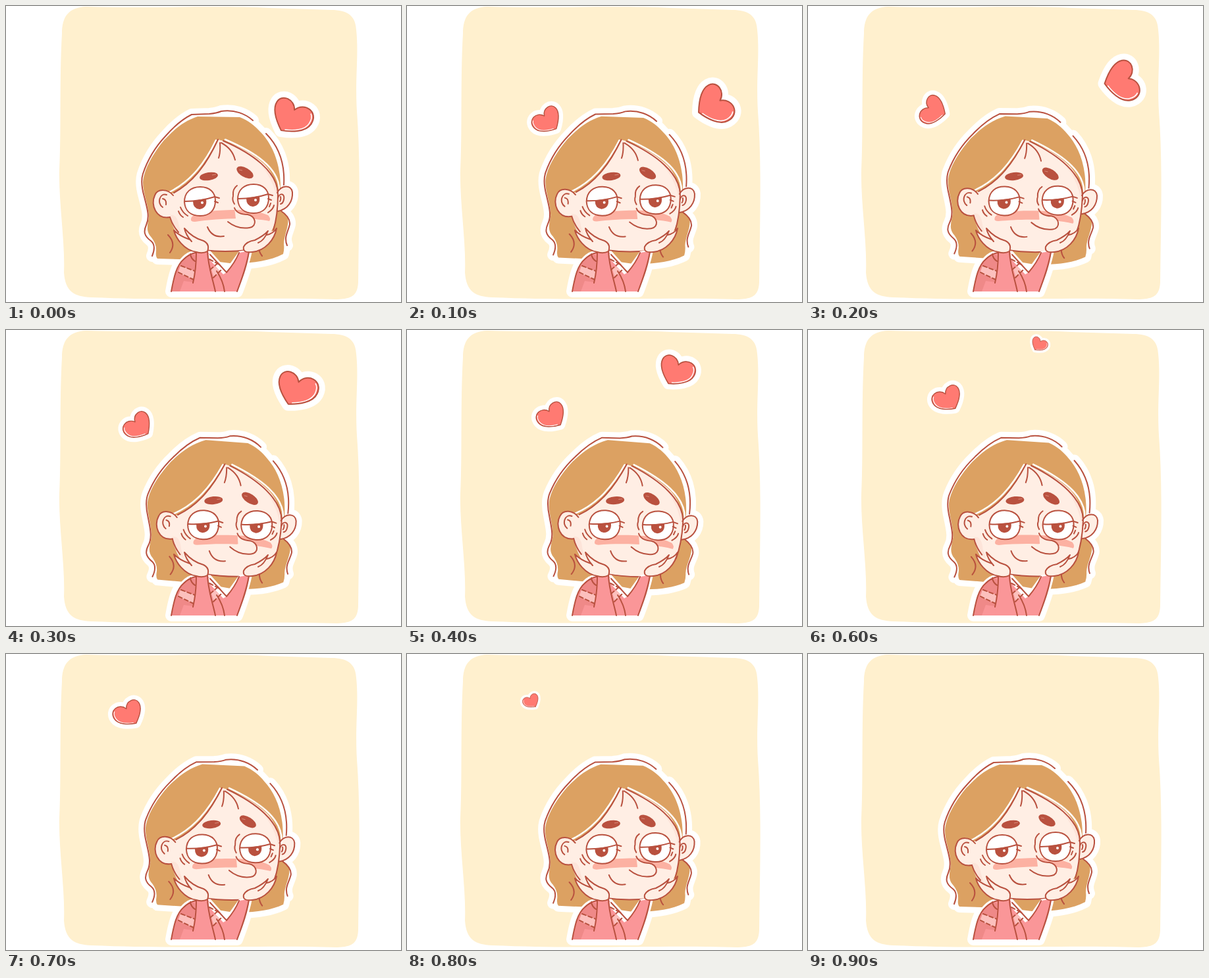
An HTML page for the animation above (1 s loop, 600x450 px).

```html
<!DOCTYPE html>
<html lang="en">
<head>
<meta charset="utf-8">
<title>Daydream</title>
<style>
html, body { margin: 0; width: 100%; height: 100%; overflow: hidden; background: #fff }
svg { display: block; width: 100vw; height: 100vh }
.line { fill: none; stroke: #b9513f; stroke-width: 2; stroke-linecap: round; stroke-linejoin: round }
.edge { fill: #fff; stroke: #fff; stroke-width: 18; stroke-linejoin: round; stroke-linecap: round }
.skin { fill: #ffeee4 }
.dark { fill: #b9513f }
.gap { fill: none; stroke: #fff; stroke-width: 2.5; stroke-linecap: round }
</style>
</head>
<body>
<svg viewBox="0 0 600 450">
  <defs>
    <path id="hair" d="M208 268C209 250 222 226 240 204C256 187 270 175 291 168L355 169C368 174 378 182 386 191C402 207 417 235 417 276L415 308L428 321C431 333 422 349 422 362Q423 370 421 377C400 388 370 392 340 391L300 386L230 384Q227 381 228 373Q229 362 221 352C211 342 216 331 217 320C216 300 208 285 208 268Z"/>
    <path id="locks" d="M222 380C227 368 225 361 220 357C209 349 209 342 213 333C219 320 214 306 210 290C206 276 205 264 208 255C214 237 226 215 243 197C257 181 270 171 282 165L309 164Q320 163 327 160C347 157 364 164 375 174M395 194C412 211 424 237 422 272M417 311Q432 321 431 332C429 341 425 347 425 354Q425 360 427 364"/>
    <path id="earL" d="M254 288C246 278 230 277 226 288C219 302 228 325 249 321"/>
    <path id="earR" d="M412 284C418 272 433 271 435 283C436 297 428 309 413 312"/>
    <path id="body" d="M251 434C255 412 259 394 270 384Q278 376 288 375L309 376L335 405L356 376L370 374C366 395 358 415 351 434Z"/>
    <path id="shape" d="M0 24C-12 17-29 5-29-9C-29-24-8-27 0-13C6-32 33-31 33-9C33 6 14 18 0 24Z"/>
    <g id="heart">
      <use href="#shape" fill="#fff" stroke="#fff" stroke-width="20" stroke-linejoin="round"/>
      <use href="#shape" fill="#ff7a72"/>
      <path d="M4 20C17 14 30 4 30-8Q30-18 24-22" fill="none" stroke="#fff" stroke-width="1.6"/>
      <use href="#shape" class="line"/>
    </g>
  </defs>

  <path fill="#fff0ce" d="M122 1C215 4 320-1 400 3L494 6C521 6 531 17 532 36C536 75 530 108 533 160C539 240 536 330 535 420C534 440 526 445 503 446C390 442 280 449 130 443C103 442 90 434 88 405C90 360 80 300 81 250C84 190 81 110 85 42C85 16 95 2 122 1Z"/>

  <use href="#body" class="edge"/>
  <g class="head">
    <g class="edge">
      <use href="#hair"/><use href="#earL"/><use href="#earR"/>
      <use href="#locks" fill="none"/>
    </g>
    <use href="#hair" fill="#dca162"/>
    <use href="#locks" class="line"/>
    <path class="line" d="M246 348Q259 361 249 375M384 366Q384 374 389 380"/>
    <use href="#earR" class="skin"/>
    <path class="skin" d="M322 203C305 240 285 270 250 286L249 320C254 340 262 352 272 362C290 374 340 374 368 371C395 362 410 340 412 310C416 282 409 257 392 240C372 222 350 212 330 205Z"/>
    <path fill="#fde0d4" opacity=".7" d="M249 318Q260 315 263 335L268 350Q255 339 249 318ZM374 228Q413 250 411 290Q402 252 374 228Z"/>
    <use href="#earL" class="skin"/>
    <path class="gap" d="M319 204C303 237 282 266 248 283M333 203C373 220 418 245 415 284"/>
    <g class="line">
      <use href="#earL"/><use href="#earR"/>
      <path d="M322 203C306 238 286 267 255 284M330 205C374 224 413 252 413 286C413 304 412 322 406 341M249 321Q253 334 262 344M300 371Q332 375 368 371M325 208Q326 222 323 231M327 208Q344 217 348 234"/>
      <path d="M244 287C233 284 229 300 238 306M238 293Q244 294 243 302M413 292C415 284 424 284 422 294Q421 300 417 301M417 290Q418 294 416 297"/>
    </g>
    <path fill="#fcb1a2" d="M281 324C282 313 312 311 342 310Q378 309 398 318Q403 323 400 327C372 321 320 323 287 328Q280 328 281 324Z"/>
    <path class="skin" d="M347 307Q351 317 367 317C380 319 382 335 370 337Q352 340 337 328L349 323Z"/>
    <g class="line">
      <path d="M347 307Q351 317 367 317C380 319 382 335 370 337Q352 340 337 328M306 336Q313 353 331 350"/>
      <path d="M262 312Q264 318 269 321M265 306Q268 314 276 319M398 314Q406 309 407 303M400 305L402 300M345 288Q344 278 351 273M347 301Q343 295 345 289"/>
      <g id="eye">
        <path fill="#fff" d="M271 298C271 283 281 275 295 275C310 275 318 284 318 296C318 311 309 319 295 319C280 319 272 311 271 298Z"/>
        <path class="dark" d="M285 297L303 294Q305 306 294 308Q285 307 285 297Z"/>
        <path d="M272 297Q295 297 317 290L324 292M317 297L322 299"/>
        <circle cx="298" cy="299" r="2" fill="#fff" stroke="none"/>
      </g>
      <use href="#eye" x="81" y="-4"/>
      <ellipse class="dark" cx="308" cy="259" rx="13" ry="5" transform="rotate(-9 308 259)"/>
      <ellipse class="dark" cx="363" cy="253" rx="13" ry="6" transform="rotate(30 363 253)"/>
    </g>
    <path d="M313 257L319 256M354 249L359 250" stroke="#d98a78"/>
  </g>

  <use href="#body" fill="#fff" stroke="#fff" stroke-width="7"/>
  <use href="#body" fill="#fa9698"/>
  <path fill="#ef8988" d="M251 434C255 412 259 394 270 384L283 377L288 380L285 420L270 418L264 434Z"/>
  <path fill="#fcc0bd" d="M265 395L288 403L286 416L261 406ZM312 400L325 391L329 401L316 413Z"/>
  <path fill="#fff" d="M309 376L335 405L330 408L304 380Z"/>
  <path fill="#fa9698" d="M288 372L307 372C309 395 315 415 318 434L284 434ZM368 373C365 395 358 415 351 434L325 434L335 407Q349 393 354 375Z"/>
  <g class="line">
    <path d="M251 434C255 412 259 394 270 385Q278 377 288 375M289 374Q289 400 284 421M306 373C307 396 314 415 318 434M320 403Q330 418 332 434M310 378L335 405Q348 390 354 375M369 373C366 395 358 415 351 434M280 377Q281 384 287 388"/>
    <path stroke-dasharray="6 4" d="M266 395L287 403M262 405L285 416M310 401L324 389M315 413L328 400M309 385L324 393"/>
  </g>
  <g class="line">
    <path class="skin" stroke="none" d="M255 341C257 352 270 371 289 374Q300 377 306 372Q309 362 300 357Q286 354 271 338Q272 347 279 355Q265 349 255 341ZM411 338C408 355 394 372 372 374Q360 376 362 365Q365 358 378 356Q390 351 396 343Q407 344 411 338Z"/>
    <path d="M279 355Q264 350 255 341C258 353 270 371 289 374Q299 377 306 373Q310 362 300 357Q284 353 271 338Q273 348 282 358M411 338C408 355 394 372 374 374Q359 376 361 366Q365 358 378 356Q392 349 398 342Q392 357 383 360M396 348Q406 346 411 338"/>
  </g>
  <use class="big" href="#heart"/>
  <use class="small" href="#heart"/>
</svg>
<script>
const STEP = 100, STEPS = 10;
const $ = s => document.querySelector(s);
const head = $('.head'), big = $('.big'), small = $('.small');
// head tilt in degrees per step
const tilt = [0, 1.1, 2.3, 3.3, 3.7, 3.6, 2.9, 1.9, .9, 0];
// x, y, turn, scale per step
const bigPath = [
  [431, 169, 33, 1], [464, 150, 61, 1], [474, 113, 78, 1], [439, 91, 25, 1],
  [407, 63, 28, .87], [376, 38, 31, .72], [350, 22, 34, .4]
];
const smallPath = [
  null, [215, 174, -43, .72], [192, 158, -70, .72], [203, 146, -48, .72],
  [222, 131, -40, .72], [239, 118, -33, .72], [214, 105, -34, .72],
  [188, 91, -34, .72], [190, 72, -34, .4]
];

function place(el, pose, flip) {
  el.style.display = pose ? '' : 'none';
  if (!pose) return;
  const [x, y, turn, s] = pose;
  el.setAttribute('transform', `translate(${x} ${y}) rotate(${turn}) scale(${s * flip} ${s})`);
  el.style.setProperty('stroke-width', 2 / s);
}

function draw(now) {
  const i = Math.floor(now / STEP) % STEPS;
  head.setAttribute('transform', `rotate(${tilt[i]} 310 385)`);
  place(big, bigPath[i], 1);
  place(small, smallPath[i], -1);
  requestAnimationFrame(draw);
}
draw(performance.now());
</script>
</body>
</html>
```
